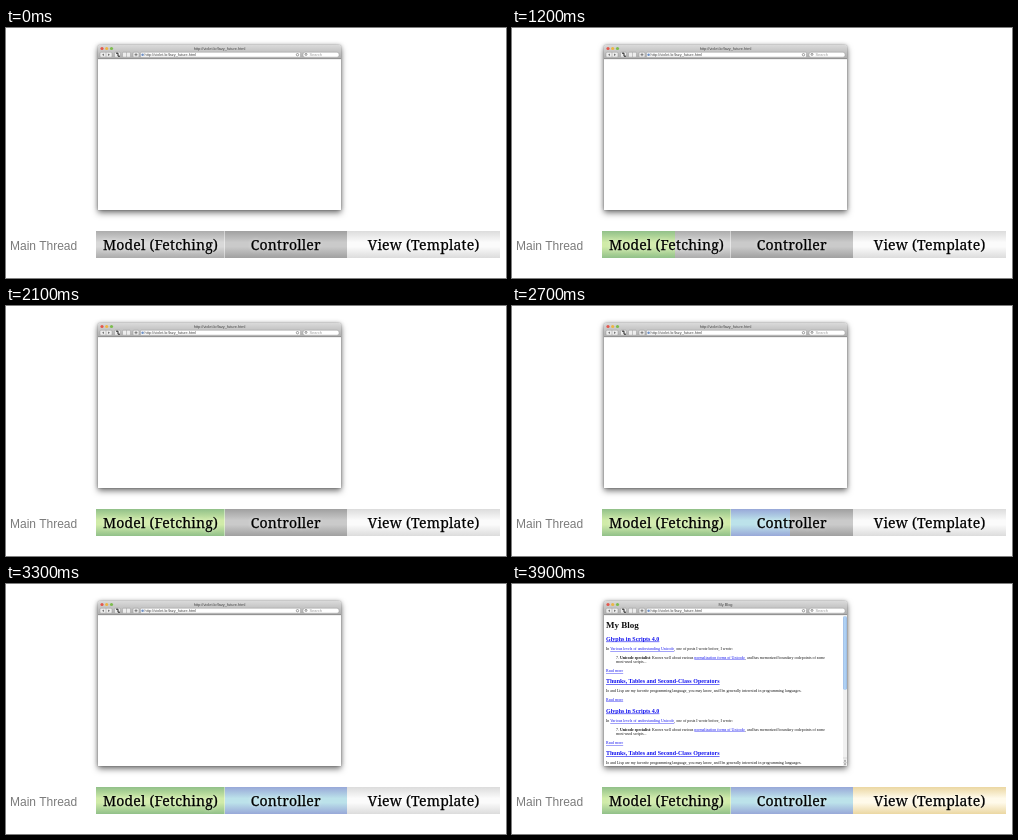
An HTML page that plays this animation: 500 by 250 pixels, repeating every 7500 ms.

```html
<!DOCTYPE html>
<html lang="en">
<head>
<meta charset="utf-8">
<title>Main thread</title>
<style>
html, body { margin: 0; width: 100%; height: 100%; overflow: hidden; background: #fff; }
.stage { position: relative; width: 500px; height: 250px; overflow: hidden; }
svg { position: absolute; left: 0; top: 0; }

.window {
  position: absolute; left: 92px; top: 17px; width: 243px; height: 165px;
  border-radius: 2px 2px 0 0; background: #fff;
  box-shadow: 0 0 1px rgba(0,0,0,.5), 0 0 4px rgba(0,0,0,.25), 0 3px 6px rgba(0,0,0,.5);
}

.track, .fill { position: absolute; left: 90px; top: 203px; width: 404px; height: 27px; overflow: hidden; }
.bar {
  position: absolute; top: 0; height: 27px;
  background: linear-gradient(var(--edge), var(--mid) 42%, var(--mid) 58%, var(--edge));
}
.model { left: 0; width: 129px; --edge: #acacac; --mid: #d8d8d8; }
.control { left: 129px; width: 122px; --edge: #a0a0a0; --mid: #cacaca; }
.view { left: 251px; width: 153px; --edge: #dcdcdc; --mid: #fbfbfb; }
.model { box-shadow: inset -1px 0 rgba(255,255,255,.4); }
.fill .model { --edge: #91c089; --mid: #d0eba8; }
.fill .control { --edge: #98a8d8; --mid: #bce2ea; }
.fill .view { --edge: #ebd7a2; --mid: #fffaea; }

.fill { animation: progress 7.5s step-end infinite; }
.after { animation: appear 7.5s step-end infinite; }
.before { animation: vanish 7.5s step-end infinite; }

@keyframes progress {
  0% { width: 0; }
  4% { width: 18px; }
  8% { width: 33px; }
  12% { width: 54px; }
  16% { width: 73px; }
  20% { width: 95px; }
  24% { width: 115px; }
  28% { width: 129px; }
  32% { width: 157px; }
  36% { width: 188px; }
  40% { width: 218px; }
  44% { width: 251px; }
  48% { width: 326px; }
  52%, 100% { width: 404px; }
}
@keyframes appear { 0% { visibility: hidden; } 52%, 100% { visibility: visible; } }
@keyframes vanish { 0% { visibility: visible; } 52%, 100% { visibility: hidden; } }

.ui { font: 3.9px "Liberation Sans", Arial, sans-serif; fill: #444; }
.page { font: 3.94px "Liberation Serif", Times, serif; fill: #111; }
.h1 { font-size: 9px; font-weight: bold; }
.h2 { font-size: 6px; font-weight: bold; }
.b { font-weight: bold; }
.link { fill: #1414f0; text-decoration: underline; }
.label {
  font: 14px "Noto Serif", serif; letter-spacing: .2px; text-anchor: middle;
  fill: #000; stroke: #000; stroke-width: .25px;
  filter: drop-shadow(0 0 2px rgba(255,255,255,.5));
}
.thread { font: 12px "Liberation Sans", Arial, sans-serif; fill: #7c7c7c; }
</style>
</head>
<body>
<div class="stage">
  <div class="window"></div>

  <div class="track">
    <div class="bar model"></div><div class="bar control"></div><div class="bar view"></div>
  </div>
  <div class="fill">
    <div class="bar model"></div><div class="bar control"></div><div class="bar view"></div>
  </div>

  <svg width="500" height="250" viewBox="0 0 500 250">
    <defs>
      <linearGradient id="chrome" x2="0" y2="1">
        <stop stop-color="#dadada"/><stop offset="1" stop-color="#acacac"/>
      </linearGradient>
      <linearGradient id="thumb">
        <stop stop-color="#7fabe4"/><stop offset=".5" stop-color="#c4e2fb"/><stop offset="1" stop-color="#74a3e0"/>
      </linearGradient>
      <clipPath id="viewport"><rect x="92" y="31" width="243" height="151"/></clipPath>
      <g id="posts">
        <text class="h2 link" x="94" y="56.5">Glyphs in Scripts 4.0</text>
        <text x="94" y="66.3">In <tspan class="link">Various levels of understanding Unicode</tspan>, one of posts I wrote before, I wrote:</text>
        <text x="104" y="74.5">7. <tspan class="b">Unicode specialist</tspan>: Knows well about various <tspan class="link">normalization forms of Unicode</tspan>, and has memorized boundary codepoints of some</text>
        <text x="104" y="79.3">most-used scripts...</text>
        <text class="link" x="94" y="88">Read more</text>
        <text class="h2 link" x="94" y="99">Thunks, Tables and Second-Class Operators</text>
        <text x="94" y="108.3">Io and Lisp are my favorite programming language, you may know, and I'm generally interested in programming languages.</text>
        <text class="link" x="94" y="116.5">Read more</text>
      </g>
    </defs>

    <g class="ui">
      <path d="M92 31V19q0-2 2-2H333q2 0 2 2V31z" fill="url(#chrome)"/>
      <path d="M92 30.7H335" stroke="#777" stroke-width=".6"/>
      <circle cx="96" cy="20.5" r="1.6" fill="#e4574c"/>
      <circle cx="100.7" cy="20.5" r="1.6" fill="#edb544"/>
      <circle cx="105.5" cy="20.5" r="1.6" fill="#7cbc4e"/>
      <g fill="#ededed" stroke="#999" stroke-width=".5">
        <rect x="94" y="24.2" width="12" height="5" rx="1"/>
        <rect x="108.5" y="24.2" width="6" height="5" rx="1"/>
        <rect x="116.5" y="24.2" width="8" height="5" rx="1"/>
        <rect x="127" y="24.2" width="6" height="5" rx="1"/>
        <rect x="134.5" y="24.2" width="160" height="5" rx="1" fill="#fff"/>
        <rect x="297" y="24.2" width="36" height="5" rx="2" fill="#fff"/>
      </g>
      <path d="M98 25.4v2.6l-2-1.3zM102 25.4v2.6l2-1.3z" fill="#777"/>
      <path d="M100 24.2v5M120.5 24.2v5" stroke="#999" stroke-width=".5"/>
      <path d="M110 25.2h2v3h2" fill="none" stroke="#222"/>
      <path d="M128.5 26.7h3M130 25.2v3" stroke="#666" stroke-width=".8"/>
      <circle cx="136.6" cy="26.7" r="1.3" fill="#6d8fc4"/>
      <text x="138.5" y="28">http://violet.kr/lazy_future.html</text>
      <circle cx="291.5" cy="26.7" r="1.2" fill="none" stroke="#777" stroke-width=".7"/>
      <circle cx="300" cy="26.4" r="1" fill="none" stroke="#555" stroke-width=".6"/>
      <text x="303.5" y="28" fill="#999">Search</text>
      <g text-anchor="middle">
        <text class="before" x="213.5" y="22">http://violet.kr/lazy_future.html</text>
        <text class="after" x="213.5" y="22">My Blog</text>
      </g>
    </g>

    <g class="page after" clip-path="url(#viewport)">
      <text class="h1" x="94" y="44">My Blog</text>
      <use href="#posts"/>
      <use href="#posts" y="72"/>
      <rect x="331" y="31" width="4" height="151" fill="#f0f0f0"/>
      <rect x="331.3" y="32" width="3.4" height="74" rx="1.7" fill="url(#thumb)"/>
      <path d="M331 174h4M331 178.500h4" stroke="#bbb" stroke-width=".5"/>
      <path d="M332 177.500h2l-1-2zM332 179.500h2l-1 2z" fill="#777"/>
    </g>

    <text class="thread" x="4" y="222">Main Thread</text>
    <g class="label">
      <text x="154.5" y="222">Model (Fetching)</text>
      <text x="279.8" y="222">Controller</text>
      <text x="417.6" y="222">View (Template)</text>
    </g>
  </svg>
</div>
</body>
</html>
```
